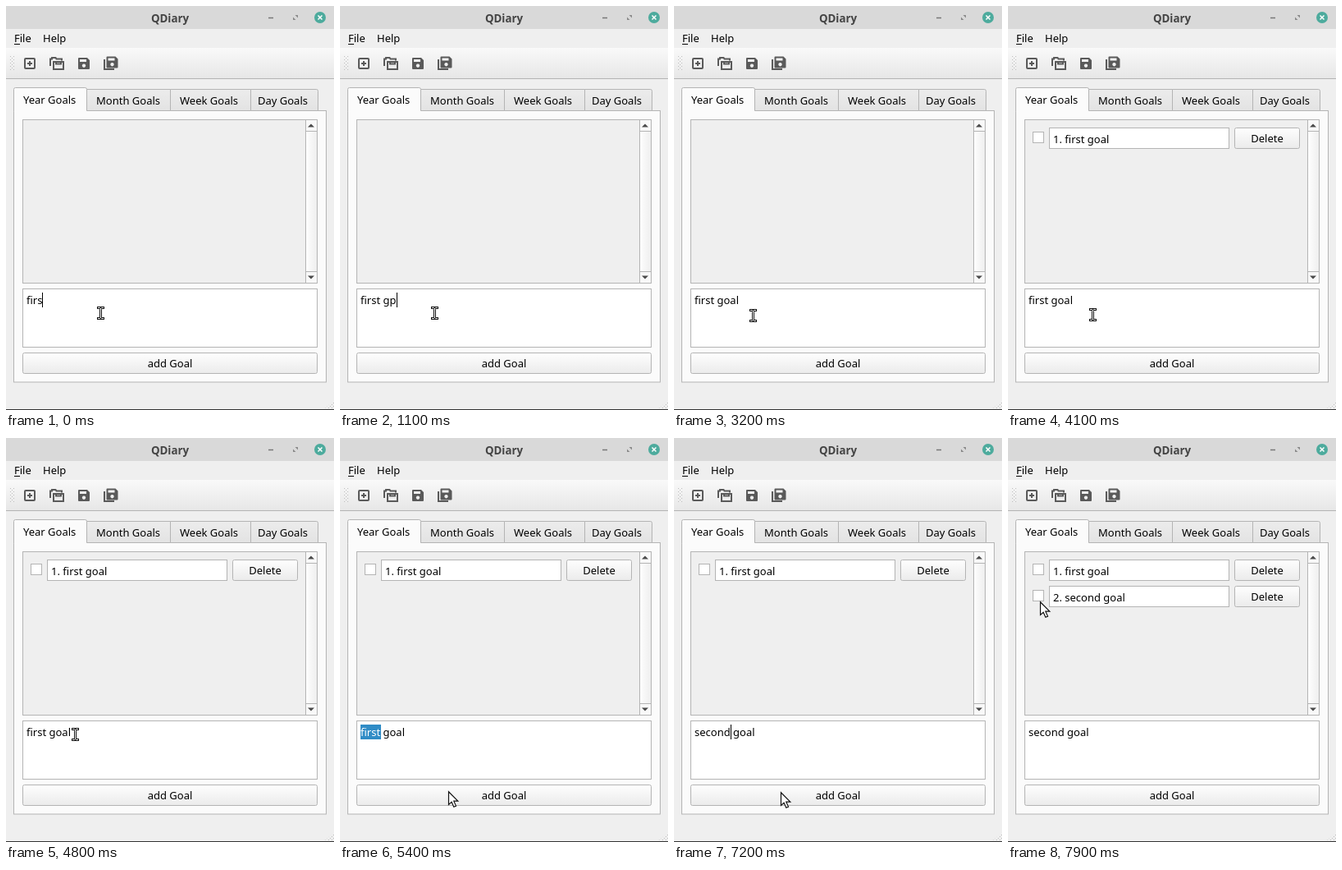
These frames come from a looping animation (400 by 492 pixels, 8 s). An HTML page:

```html
<!DOCTYPE html>
<html lang="en">
<head>
<meta charset="utf-8">
<title>QDiary</title>
<style>
  html, body { margin: 0; width: 100%; height: 100%; overflow: hidden; background: #efefef; }
  svg { display: block; width: 400px; height: 492px; }
  text { font: 13px "Noto Sans", "Open Sans", sans-serif; fill: #000; white-space: pre; }
  .title { font-size: 13.33px; font-weight: 700; fill: #444; }
  .mid { text-anchor: middle; }
  .line { stroke: #b4b4b4; }
  .icon { fill: none; stroke: #5a5a5a; stroke-width: 2; }
  .solid { fill: #5a5a5a; stroke: none; }
  .hide { visibility: hidden; }
</style>
</head>
<body>
<svg viewBox="0 0 400 492">
  <defs>
    <linearGradient id="btn" x2="0" y2="1">
      <stop stop-color="#fefefe"/><stop offset="1" stop-color="#ebebeb"/>
    </linearGradient>
    <linearGradient id="bar" x2="0" y2="1">
      <stop stop-color="#f9f9f9"/><stop offset="1" stop-color="#e7e7e7"/>
    </linearGradient>
    <linearGradient id="tab" x2="0" y2="1">
      <stop stop-color="#ececec"/><stop offset="1" stop-color="#e3e3e3"/>
    </linearGradient>
    <linearGradient id="handle">
      <stop stop-color="#fefefe"/><stop offset="1" stop-color="#eeeeee"/>
    </linearGradient>
    <pattern id="dots" width="4" height="4" patternUnits="userSpaceOnUse">
      <path d="M1 1h1v1h-1zM3 3h1v1h-1z" fill="#bdbdbd"/>
    </pattern>
    <g id="floppy">
      <path class="solid" fill-rule="evenodd" d="M1 0h10l3 3v10q0 1-1 1h-12q-1 0-1-1v-12q0-1 1-1zM2 2v3h8v-3zM7 7.5a2.2 2.2 0 1 0 .01 0z"/>
    </g>
    <g id="row">
      <rect class="line" x="30.5" y="153.5" width="13" height="13" fill="#fff"/>
      <rect class="line" x="50.5" y="148.5" width="219" height="25" fill="#fff"/>
      <rect class="line" x="276.5" y="148.5" width="79" height="25" rx="2" fill="url(#btn)"/>
      <text class="mid" x="316" y="166">Delete</text>
    </g>
  </defs>

  <rect width="400" height="492" fill="#efefef"/>

  <!-- title bar -->
  <rect width="400" height="28" fill="#d9d9d9"/>
  <text class="title mid" x="200" y="20">QDiary</text>
  <path d="M320 14.5h6" stroke="#777" stroke-width="1.5"/>
  <path d="M352.5 11h3.5v3.5zM350 13.5v3.5h3.5z" fill="#8a8a8a"/>
  <circle cx="383" cy="14" r="7" fill="#4dab9d"/>
  <path d="M380.5 11.5l5 5m0-5l-5 5" stroke="#fff" stroke-width="1.5"/>

  <!-- menu -->
  <text x="10" y="44">File</text>
  <path d="M10 46.5h7" stroke="#000"/>
  <text x="45" y="44">Help</text>

  <!-- toolbar -->
  <rect y="51" width="400" height="37" fill="url(#bar)"/>
  <path d="M0 88.5h400" class="line"/>
  <rect x="4" y="61" width="6" height="18" fill="url(#dots)"/>
  <g class="icon">
    <rect x="23" y="64" width="12" height="12" rx="1"/>
    <path d="M29 67v6M26 70h6"/>
    <path d="M54 73v-8.5h2v-1.500h4.500l1 1.500h6.500v2"/>
    <path d="M58 68h12v9h-12z"/>
    <path d="M61 67.500v3h6v-3"/>
    <use href="#floppy" x="88" y="63"/>
    <path d="M120 65v12h12"/>
    <use href="#floppy" x="122.500" y="61.500"/>
  </g>

  <!-- tabs -->
  <rect class="line" x="9.500" y="127.500" width="381" height="330.500" fill="#fbfbfb"/>
  <g class="line" fill="url(#tab)">
    <path d="M98.500 127.500v-26h102v26z"/>
    <path d="M200.500 127.500v-26h98v26z"/>
    <path d="M298.500 127.500v-26h80q2 0 2 2v24z"/>
  </g>
  <path class="line" d="M9.500 128.500v-27q0-2 2-2h85q2 0 2 2v26" fill="#fbfbfb"/>
  <rect x="10" y="126" width="88" height="4" fill="#fbfbfb"/>
  <text x="21" y="119">Year Goals</text>
  <text x="110" y="120">Month Goals</text>
  <text x="212" y="120">Week Goals</text>
  <text x="307" y="120">Day Goals</text>

  <!-- goal list -->
  <rect class="line" x="20.500" y="138.500" width="359" height="199" fill="#efefef"/>
  <rect class="line" x="365.500" y="138.500" width="14" height="199" fill="#f8f8f8"/>
  <rect class="line" x="365.500" y="152.500" width="14" height="171" fill="url(#handle)"/>
  <path d="M368 147.500l4-4 4 4zM368 328.500l4 4 4-4z" fill="#4a4a4a"/>
  <g id="goal1" class="hide">
    <use href="#row"/><text x="55" y="167">1. first goal</text>
  </g>
  <g id="goal2" class="hide" transform="translate(0 32)">
    <use href="#row"/><text x="55" y="167">2. second goal</text>
  </g>

  <!-- editor -->
  <rect class="line" x="20.500" y="344.500" width="359" height="71" fill="#fff"/>
  <rect id="mark" class="hide" x="25" y="349" width="25" height="18" fill="#308cc6"/>
  <text x="25" y="363"><tspan id="head"></tspan><tspan id="tail"></tspan></text>
  <rect id="caret" width="1" height="18"/>

  <rect class="line" x="20.500" y="422.500" width="359" height="25" rx="2" fill="url(#btn)"/>
  <text class="mid" x="200" y="440">add Goal</text>

  <rect x="388" y="480" width="12" height="11" fill="url(#dots)" clip-path="polygon(100% 0, 100% 100%, 0 100%)"/>
  <path d="M0 491.500h400" stroke="#333"/>

  <!-- pointers -->
  <g id="beam" fill="none" stroke-linecap="square">
    <path id="stem" d="M-3-6.500h2l1 1 1-1h2M0-5.500v11M-3 6.500h2l1-1 1 1h2" stroke="#111" stroke-width="3"/>
    <use href="#stem"/>
    <path d="M-3-6.500h2l1 1 1-1h2M0-5.500v11M-3 6.500h2l1-1 1 1h2" stroke="#fff"/>
  </g>
  <path id="arrow" d="M.5.800v15.700l3.600-3.300 2.700 6.100 2.700-1.200-2.700-5.900h5z" fill="#fff" stroke="#111" stroke-width="1.200"/>
</svg>
<script>
const $ = id => document.getElementById(id);
const LOOP = 8000;

// [ms, text before caret, text after, caret: 0 off, 1 on, 2 on next line, 3 selection]
const typing = [
  [0, 'firs', '', 1], [100, 'firs', '', 0],
  [400, 'first', '', 1], [500, 'first ', '', 1], [800, 'first g', '', 0],
  [1100, 'first gp', '', 1], [1400, 'first g', '', 1], [1500, 'first g', '', 0],
  [1700, 'first go', '', 1], [1800, 'first goa', '', 1], [1900, 'first goal', '', 1],
  [2000, 'first goal', '', 0], [2300, 'first goal', '', 2], [2700, 'first goal', '', 0],
  [5200, 'first', ' goal', 3],
  [5500, 's', ' goal', 1], [5600, 'se', ' goal', 1], [5700, 'sec', ' goal', 1],
  [6000, 'sec', ' goal', 0], [6200, 'seco', ' goal', 1],
  [6500, 'secon', ' goal', 1], [6600, 'second', ' goal', 0],
  [7200, 'second', ' goal', 1], [7300, 'second', ' goal', 0]
];

// Each run: start ms, then one [x, y] per 100 ms; the last place holds.
const moves = [
  [0, [115.5, 374]],
  [3200, [96.5, 377], [89, 400], [86, 433], [82, 427]],
  [3900, [83.5, 408], [93.5, 389], [103.5, 376], [115.5, 368], [124.5, 363],
         [127.5, 359], [124.5, 357], [116.5, 360], [107.5, 363]],
  [4800, [84.5, 361], [55.5, 357], [40.5, 356]],
  [5300, [95.5, 388], [132, 430], [132, 431], [131, 431], [130, 431]],
  [7500, [168.5, 400], [184, 330], [160, 262], [90, 212], [39, 199]]
];

const latest = (track, t) => track.findLast(step => step[0] <= t);
const show = (el, on) => { el.style.visibility = on ? 'visible' : 'hidden'; };

function drawEditor(t) {
  const [, head, tail, mode] = latest(typing, t);
  $('head').textContent = head;
  $('tail').textContent = tail;
  $('head').style.fill = mode === 3 ? '#fff' : '';
  show($('mark'), mode === 3);
  show($('caret'), mode === 1 || mode === 2);
  const width = mode === 1 ? $('head').getComputedTextLength() : 0;
  $('caret').setAttribute('x', Math.round(25 + width));
  $('caret').setAttribute('y', mode === 2 ? 367 : 349);
}

function drawPointer(t) {
  const [start, ...path] = latest(moves, t);
  const step = Math.min(Math.floor((t - start) / 100), path.length - 1);
  const [x, y] = path[step];
  const overText = y > 344 && y < 416;
  const pointer = $(overText ? 'beam' : 'arrow');
  pointer.setAttribute('transform', `translate(${x} ${y})`);
  show($('beam'), overText);
  show($('arrow'), !overText);
}

function frame() {
  const t = performance.now() % LOOP;
  drawEditor(t);
  drawPointer(t);
  show($('goal1'), t >= 3700);
  show($('goal2'), t >= 7300);
  requestAnimationFrame(frame);
}
frame();
</script>
</body>
</html>
```
